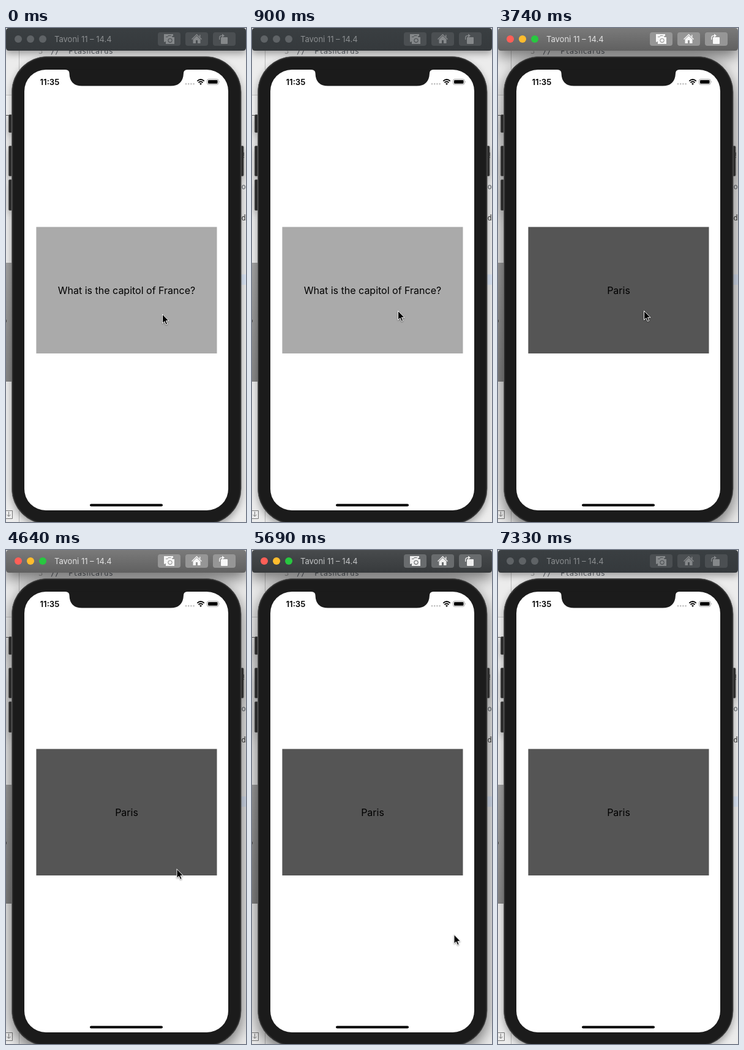
Recreate the animation shown at these times as an HTML page. Size 392 by 806 pixels, loop 7.43 s.

```html
<!DOCTYPE html>
<html lang="en">
<head>
<meta charset="utf-8">
<title>Flashcards</title>
<style>
  html, body { margin: 0; width: 100%; height: 100%; overflow: hidden; background: #e6e6e6; }
  svg { display: block; width: 392px; height: 806px; font-family: Inter, Roboto, sans-serif; }
  .mono { font: 12.1px "DejaVu Sans Mono", "Noto Sans Mono", monospace; }

  .idle { --top: #3a3f42; --low: #35393c; --name: #8b8e90; --key: #4b4f52; --icon: #85888a;
          --red: #5f6366; --amber: #5f6366; --green: #5f6366; }
  .lit  { --top: #7a7a7a; --low: #606060; --name: #e2e2e2; --key: #969696; --icon: #f7f7f7;
          --red: #ff5f57; --amber: #febc2e; --green: #28c840; }
  .dark { --top: #484b4d; --low: #373a3c; --name: #c2c4c5; --key: #696c6e; --icon: #eeeeee;
          --red: #ff5f57; --amber: #febc2e; --green: #28c840; }
  #device { filter: drop-shadow(0 9px 12px #0008); }
  .idle #device { filter: drop-shadow(0 5px 6px #0005); }

  .key { fill: var(--key); }
  .solid { fill: var(--icon); }
  .line { fill: none; stroke: var(--icon); stroke-width: 1.3; }
  .button { fill: #2b2b2b; stroke: #555; stroke-width: .8; }
  #cursor { filter: drop-shadow(0 1px 1px #0006); }
</style>
</head>
<body>
<svg id="stage" class="idle" viewBox="0 0 392 806">
  <defs>
    <linearGradient id="bar" x2="0" y2="1">
      <stop style="stop-color: var(--top)"/>
      <stop offset="1" style="stop-color: var(--low)"/>
    </linearGradient>
    <linearGradient id="pane" x2="0" y2="1">
      <stop stop-color="#a0a0a0"/>
      <stop offset="1" stop-color="#858585"/>
    </linearGradient>
  </defs>

  <!-- editor behind the simulator -->
  <rect width="392" height="806" fill="#ececec"/>
  <path d="M21.5 37V806" stroke="#bbb"/>
  <rect y="110" width="9" height="32" fill="#f4f4f4"/>
  <path d="M0 109.5H9" stroke="#c8c8c8"/>
  <path d="M0 142.5H9" stroke="#555"/>
  <rect y="383" width="21" height="194" fill="url(#pane)"/>
  <path d="M0 476V480" stroke="#333" stroke-width="1.5"/>
  <rect x="376" y="402" width="16" height="17" fill="#dce6f6"/>
  <g class="mono" fill="#5d6269">
    <text x="53" y="42" fill="#a5a5a5">3</text>
    <text x="73" y="42" xml:space="preserve">//  Flashcards</text>
    <text x="384.5" y="212" fill="#222">!</text>
    <text x="384.5" y="263">o</text>
    <text x="384.5" y="314" fill="#333">d</text>
  </g>
  <path d="M0 787.5H10.5V800.5H0M4.5 789V797M1.5 794L4.5 797L7.5 794" fill="none" stroke="#777"/>

  <g id="device">
    <g class="button">
      <rect x="4.5" y="141.5" width="8" height="29" rx="1.5"/>
      <rect x="4.5" y="192.5" width="8" height="49" rx="1.5"/>
      <rect x="4.5" y="247.5" width="8" height="50" rx="1.5"/>
      <rect x="380" y="192.5" width="8" height="49" rx="1.5"/>
    </g>
    <rect x="9.5" y="46.5" width="374.5" height="763" rx="58" fill="#1b1b1b" stroke="#666"/>
    <rect x="10.8" y="47.8" width="372" height="760.4" rx="57" fill="none" stroke="#2e2e2e" stroke-width="1.5"/>
    <path d="M0 5Q0 0 5 0H387Q392 0 392 5V32Q392 37 387 37H5Q0 37 0 32Z" fill="url(#bar)"/>
  </g>

  <!-- title bar -->
  <circle cx="20" cy="18" r="6" style="fill: var(--red)"/>
  <circle cx="40" cy="18" r="6" style="fill: var(--amber)"/>
  <circle cx="60" cy="18" r="6" style="fill: var(--green)"/>
  <text x="79" y="23" font-size="13" style="fill: var(--name)">Tavoni 11 – 14.4</text>
  <g class="key">
    <rect x="248" y="7" width="37" height="22" rx="4"/>
    <rect x="293" y="7" width="37" height="22" rx="4"/>
    <rect x="338" y="7" width="37" height="22" rx="4"/>
  </g>
  <path class="line" d="M260 22H258.7V10.7H272.3V13"/>
  <path class="solid" d="M258 10H273V13H270L269 12H265L264 14H261V22H258Z"/>
  <path class="solid" d="M261 15H264L265.3 13H270.7L272 15H275V26H261Z"/>
  <circle class="key" cx="268" cy="20.3" r="3.6"/>
  <circle class="solid" cx="268" cy="20.3" r="2.5"/>
  <path class="line" d="M303.5 18.5L311.5 10.7L319.5 18.5M316.8 11V15"/>
  <path class="solid" d="M305.5 18.5L311.5 12.8L317.5 18.5V25H313V20H310V25H305.5Z"/>
  <rect class="solid" x="351" y="15" width="11" height="11" rx="1"/>
  <path class="line" d="M348.7 19V16Q348.7 12.6 352 12.6H354"/>
  <path class="solid" d="M353 9.5L357 12.6L353 15.5Z"/>

  <!-- phone screen -->
  <rect x="30" y="68" width="333" height="719" rx="35" fill="#fff"/>
  <path d="M97 67.5H296V68Q290 68.5 290 74Q289 94.5 269 94.5H124Q104 94.5 103.5 74Q103.5 68.5 97 68Z" fill="#1b1b1b"/>
  <text x="55.5" y="92.5" font-size="13.2" font-weight="600">11:35</text>
  <path d="M294 91.3H308" stroke="#bbb" stroke-width="2.6" stroke-linecap="round" stroke-dasharray="0 4.2"/>
  <path d="M312.3 86.7Q318 81.3 323.7 86.7M314.4 89.2Q318 85.8 321.6 89.2" fill="none" stroke="#000" stroke-width="1.8"/>
  <path d="M316 90.8Q318 89.2 320 90.8L318 93Z"/>
  <rect x="328.5" y="83.5" width="18.5" height="8.8" rx="2.4" fill="none" stroke="#999" stroke-width=".9"/>
  <rect x="330" y="85" width="15.5" height="5.8" rx="1.2"/>
  <path d="M348 86.3Q349.5 87.9 348 89.5Z" fill="#999"/>
  <rect x="137" y="776.5" width="119" height="4" rx="2"/>

  <rect id="card" x="49.4" y="324.6" width="295.1" height="206.4"/>
  <text id="label" x="197" y="434" font-size="16" text-anchor="middle"></text>

  <path id="cursor" d="M0 0V14.8L3.4 11.7L5.8 17L8.2 16L5.9 10.8H10.5Z" stroke="#fff" stroke-width="1" stroke-linejoin="round"/>
</svg>
<script>
  const LOOP = 7430;
  const [stage, card, label, cursor] =
    ["stage", "card", "label", "cursor"].map(id => document.getElementById(id));

  // pointer samples: start time, tip x, tip y
  const pointer = [
    [0, 255.5, 467], [150, 250, 466], [300, 246, 465], [450, 242, 464],
    [600, 240, 463], [750, 239, 462.5], [900, 238.5, 461.5], [4490, 240.5, 461.5],
    [4640, 279, 520.5], [4790, 330, 625.5], [5690, 330, 627.5],
    [5840, 331.5, 651.5], [5990, 352, 749.5]
  ];
  const themes = [[0, "idle"], [3590, "lit"], [4790, "dark"], [7330, "idle"]];
  const at = (list, t) => list.filter(step => step[0] <= t).pop();

  function draw(t) {
    const flipped = t >= 3740;
    const [, x, y] = at(pointer, t);
    stage.setAttribute("class", at(themes, t)[1]);
    card.setAttribute("fill", flipped ? "#555" : "#aaa");
    label.textContent = flipped ? "Paris" : "What is the capitol of France?";
    cursor.setAttribute("transform", `translate(${x} ${y})`);
    cursor.setAttribute("visibility", t < 6140 ? "visible" : "hidden");
  }

  const start = performance.now();
  function tick() {
    draw((performance.now() - start) % LOOP);
    requestAnimationFrame(tick);
  }
  tick();
</script>
</body>
</html>
```
